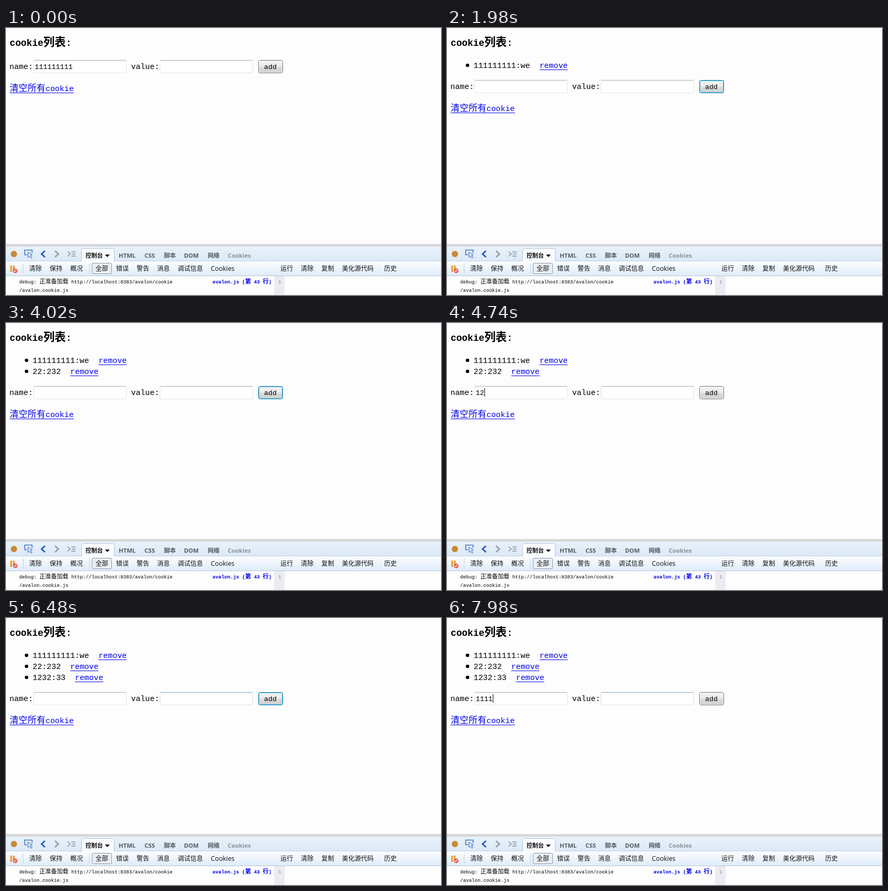
These frames come from a looping animation (826x508 px, 8 s). An HTML page:

```html
<!DOCTYPE html>
<html lang="zh-CN">
<head>
<meta charset="utf-8">
<title>cookie列表</title>
<style>
html, body { margin: 0; width: 100%; height: 100%; overflow: hidden; background: #fdfdfd; }
svg { display: block; }
text { white-space: pre; font-family: "Liberation Mono", monospace; }
.ui { font-family: "Open Sans", "Noto Sans CJK SC", "Noto Sans CJK", sans-serif; }
.han { font-family: "Noto Sans CJK SC", "Noto Sans CJK", sans-serif; }
</style>
</head>
<body>
<svg id="stage" width="826" height="508" viewBox="0 0 826 508">
  <defs>
    <linearGradient id="btn0" x2="0" y2="1">
      <stop offset="0" stop-color="#f3f3f3"/><stop offset=".48" stop-color="#ebebeb"/>
      <stop offset=".52" stop-color="#dcdcdc"/><stop offset="1" stop-color="#cecece"/>
    </linearGradient>
    <linearGradient id="btn1" x2="0" y2="1">
      <stop offset="0" stop-color="#eaf5fc"/><stop offset=".48" stop-color="#d9effb"/>
      <stop offset=".52" stop-color="#bfe5fb"/><stop offset="1" stop-color="#a9d8f2"/>
    </linearGradient>
    <linearGradient id="tabs" x2="0" y2="1">
      <stop offset="0" stop-color="#e9f2fb"/><stop offset="1" stop-color="#dbe8f6"/>
    </linearGradient>
    <linearGradient id="tools" x2="0" y2="1">
      <stop offset="0" stop-color="#fbfdff"/><stop offset="1" stop-color="#dfecf9"/>
    </linearGradient>
  </defs>
  <rect width="826" height="508" fill="#fdfdfd"/>
  <g id="page"></g>
  <g id="panel"></g>
</svg>
<script>
const LOOP = 8000, ADV = 8.94, BLUE = '#0000e8';
const rowY = [61, 99, 120, 141];
const cookies = [['111111111', 'we'], ['22', '232'], ['1232', '33']];

// Changes over time: c = caret field, n/v = field border, b = button look
const steps = [
  [0, { k: 0, name: '111111111', value: '', c: '', n: 0, v: 0, b: 0 }],
  [300, { b: 1 }], [420, { b: 0 }],
  [660, { n: 1 }], [900, { n: 0, v: 1 }],
  [1080, { v: 2 }], [1200, { c: 'v' }],
  [1380, { value: 'w' }], [1500, { value: 'we', b: 1 }],
  [1800, { c: '', v: 0, b: 2 }],
  [1980, { k: 1, name: '', value: '' }],
  [2340, { n: 1 }], [2520, { c: 'n', b: 0 }],
  [2700, { name: '2' }], [2880, { n: 0, v: 1 }],
  [3180, { name: '22' }], [3240, { c: 'v', v: 2 }],
  [3360, { value: '2' }], [3480, { value: '23' }], [3600, { value: '232' }],
  [3660, { b: 1 }], [3840, { c: '', v: 0, b: 2 }],
  [4020, { k: 2, name: '', value: '' }],
  [4140, { n: 1 }], [4260, { c: 'n', b: 0 }],
  [4500, { name: '1' }], [4740, { name: '12', n: 0 }],
  [4920, { name: '123' }], [5040, { name: '1232' }], [5160, { v: 1 }],
  [5340, { c: 'v', v: 2 }], [5640, { value: '3' }],
  [5940, { value: '33' }], [6060, { b: 1 }], [6120, { c: '', v: 1, b: 2 }],
  [6360, { k: 3, name: '', value: '' }],
  [6600, { n: 1 }], [6960, { c: 'n', b: 1 }], [7020, { n: 0, b: 0 }],
  [7440, { name: '1' }], [7800, { name: '11' }],
  [7920, { name: '111' }], [7980, { name: '1111' }]
];

const rect = (x, y, w, h, fill, more = '') =>
  `<rect x="${x}" y="${y}" width="${w}" height="${h}" fill="${fill}" ${more}/>`;
const path = (d, stroke, w = 1, fill = 'none') =>
  `<path d="${d}" stroke="${stroke}" stroke-width="${w}" fill="${fill}"/>`;

// Mixed text: Latin in the mono face, Chinese runs in their own size
function mono(x, y, str, size = 14.9, han = 17, fill = '#000', more = '') {
  const body = str.replace(/[\u4e00-\u9fff]+/g, s => `<tspan class="han" font-size="${han}">${s}</tspan>`);
  return `<text x="${x}" y="${y}" font-size="${size}" fill="${fill}" ${more}>${body}</text>`;
}
const ui = (x, y, str, size, fill = '#111', more = '') =>
  `<text class="ui" x="${x}" y="${y}" font-size="${size}" fill="${fill}" ${more}>${str}</text>`;

function link(x, y, str, w, gap) {
  return mono(x, y, str, 14.9, 17, BLUE) + rect(x, y + gap, w, 1, BLUE);
}

function field(x, y, str, look, caret) {
  const top = ['#abadb3', '#7fa9cc', '#4f8fbc'][look];
  const side = ['#e0e2e8', '#cfe0ee', '#b5d3e8'][look];
  return rect(x + .5, y + .5, 176, 24, '#fff', `stroke="${side}" rx="1"`) +
    rect(x + 1, y, 175, 1, top) +
    mono(x + 2.5, y + 17, str, 13.33) +
    (caret ? rect(x + 2 + str.length * 8 + (str ? 1 : 0), y + 4, 1, 16, '#000') : '');
}

function button(y, look) {
  const edge = ['#707070', '#3c7fb1', '#2c7fa8'][look];
  const inner = ['#f8f8f8', '#f0faff', '#45c4ec'][look];
  return rect(479.5, y + .5, 46, 24, `url(#btn${look === 1 ? 1 : 0})`, `rx="3" stroke="${edge}"`) +
    rect(480.5, y + 1.5, 44, 22, 'none', `rx="2" stroke="${inner}"`) +
    mono(490, y + 17, 'add', 13.33);
}

function page(s) {
  const y = rowY[s.k];
  const list = cookies.slice(0, s.k).map(([name, value], i) => {
    const str = name + ':' + value, base = 76 + i * 21;
    return `<circle cx="39" cy="${base - 5}" r="3.3"/>` + mono(50.5, base, str) +
      link(50.5 + (str.length + 2) * ADV, base, 'remove', 6 * ADV, 3);
  }).join('');
  return mono(7, 34, 'cookie列表:', 17.8, 21.3, '#000', 'font-weight="700"') + list +
    mono(6.5, y + 17, 'name:') + field(52, y, s.name, s.n, s.c === 'n') +
    mono(237.5, y + 17, 'value:') + field(292, y, s.value, s.v, s.c === 'v') +
    button(y, s.b) + link(7, y + 59, '清空所有cookie', 122, 3);
}

function panel() {
  let out = rect(0, 411, 826, 5, '#d8d8d8') + rect(0, 416, 826, 28, 'url(#tabs)') +
    rect(0, 443, 826, 1, '#c3d3e4') + rect(0, 444, 826, 27, 'url(#tools)') +
    rect(0, 471, 826, 1, '#b4c6d9') + rect(0, 472, 826, 36, '#fdfdfd') +
    path('M143.5 444V422.500Q143.500 419.500 146.500 419.500H202.500Q205.500 419.500 205.500 422.500V444', '#b3c4d6', 1, '#fafcff');

  // Icons
  out += '<circle cx="15" cy="430" r="6" fill="#c98a35"/>' +
    path('M40 431.500H35.500V422.500H49.500V428', '#3f74c6', 1.6) +
    path('M41.500 426.500L50 431.500L46.500 432.500L49.500 436.500L47.500 438L44.500 434L42 436.500Z', '#2f62b5', 1, '#dfeafa') +
    path('M74 424L67.500 430L74 436', '#2758bb', 2.8) +
    path('M93 424L99.500 430L93 436', '#9a9fa6', 2.8) +
    path('M117 425.500L122 430L117 434.500M124 426H132M125.500 430H132M124 434H132', '#8c929a', 1.6) +
    rect(8, 452, 3.5, 12, '#eca03c') + rect(13, 452, 3.5, 7, '#eca03c') +
    '<circle cx="17.500" cy="462" r="3.400" fill="#fff" stroke="#e0362c" stroke-width="1.600"/>' +
    path('M15.300 459.800L19.700 464.200', '#e0362c', 1.5) +
    rect(32, 448, 1, 19, '#c2cfdd') + rect(158, 448, 1, 19, '#c2cfdd') +
    rect(163.5, 447.5, 37, 20, '#e9eef4', 'rx="2" stroke="#8d9aa8"');

  const bold = 'font-weight="700"';
  out += ui(151, 437, '控制台', 11, '#111', bold) + path('M188 431H197L192.500 436Z', 'none', 0, '#111');
  [[214, 'HTML'], [263, 'CSS'], [300, '脚本'], [338, 'DOM'], [383, '网络'], [421, 'Cookies']]
    .forEach(([x, s]) => out += ui(x, 437, s, 11.3, s === 'Cookies' ? '#8c9299' : '#555b62', bold));

  [[44, '清除'], [83, '保持'], [122, '概况'], [170, '全部'], [209, '错误'], [248, '警告'], [287, '消息'],
    [326, '调试信息'], [389, 'Cookies'], [521, '运行'], [560, '清除'], [599, '复制'], [638, '美化源代码'], [718, '历史']]
    .forEach(([x, s]) => out += ui(x, 462, s, s === 'Cookies' ? 12.3 : 12));

  return out + rect(509, 472, 20, 36, '#ecebf1') + mono(517, 486, '1', 9.2, 11, '#888') +
    mono(25, 486, 'debug: 正准备加载 http://localhost:8383/avalon/cookie', 9.17, 11) +
    mono(25, 502, '/avalon.cookie.js', 9.17, 11) +
    mono(392, 486, 'avalon.js (第 43 行)', 9.4, 11.2, BLUE, bold);
}

function stateAt(t) {
  return Object.assign({}, ...steps.filter(s => s[0] <= t).map(s => s[1]));
}

const pageEl = document.getElementById('page');
document.getElementById('panel').innerHTML = panel();
let shown = '', start;

function draw(t) {
  const html = page(stateAt(t));
  if (html !== shown) pageEl.innerHTML = shown = html;
}
function tick(now) {
  start ??= now;
  draw((now - start) % LOOP);
  requestAnimationFrame(tick);
}
draw(0);
requestAnimationFrame(tick);
</script>
</body>
</html>
```
